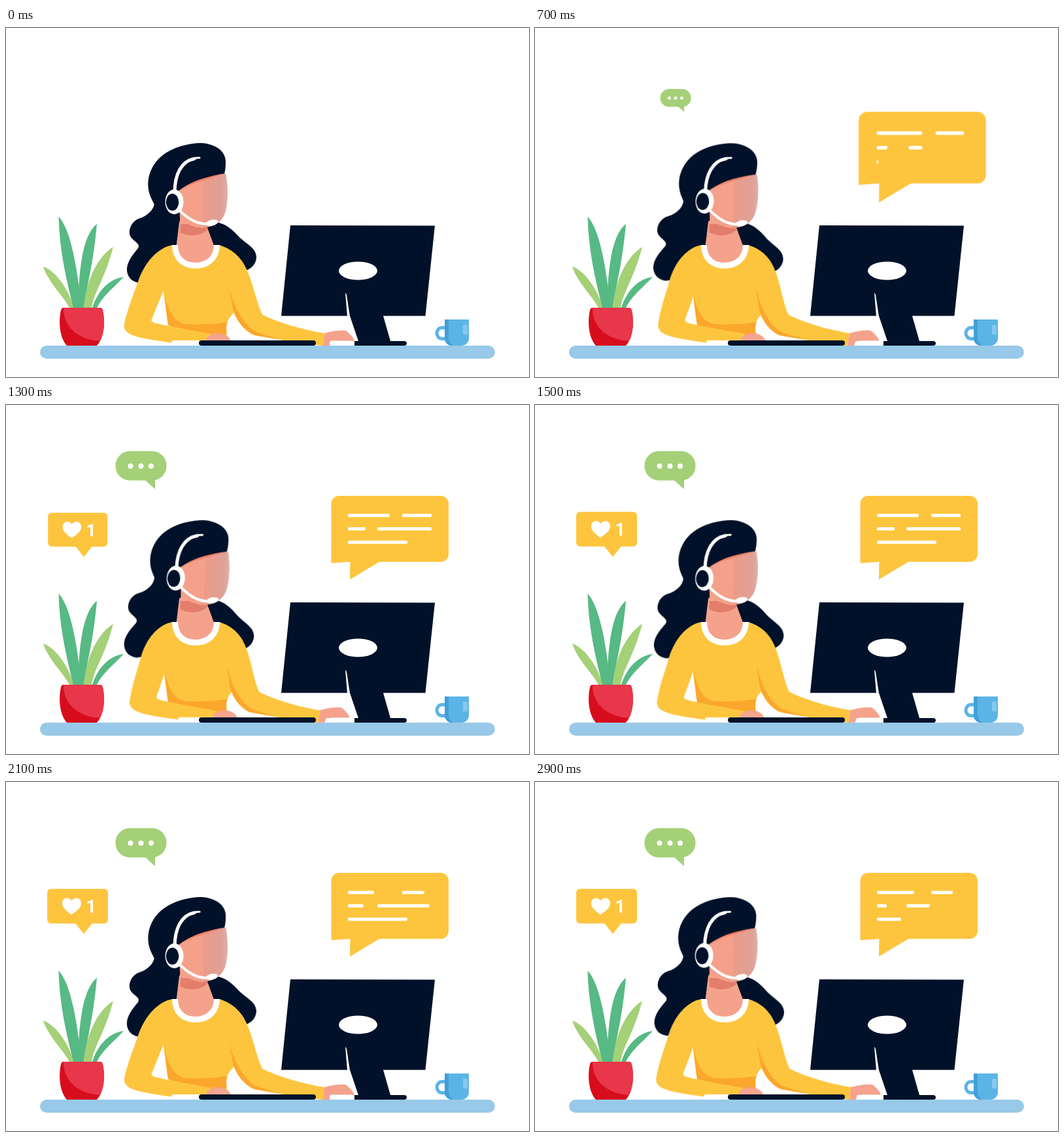
An HTML page without scripts that plays this animation: 800 by 534 pixels, repeating every 3 s.

```html
<!DOCTYPE html>
<html lang="en">
<head>
<meta charset="utf-8">
<title>Support desk</title>
<style>
html, body { margin: 0; height: 100%; overflow: hidden; background: #fff; }
svg { display: block; width: 100vw; height: 100vh; color: #fff; background: currentColor; animation: dim 3s steps(1) infinite; }
.paper { fill: currentColor; }
.wire { fill: none; stroke: currentColor; stroke-linecap: round; }
.navy { fill: #001129; }
.gold { fill: #fdc53e; }
.amber { fill: #fba62d; }
.skin { fill: #f5a28c; }
.leaf { fill: #57b983; }
.lime { fill: #a4d078; }
.sky { fill: #98c9e8; }
.cup { fill: #5cb4e6; }

@keyframes dim {
  0%, 16.67% { color: #fff; }
  13.33% { color: #f3f2f0; }
}

/* --r turns a part, --k leans it, both around --o */
.sway { --r: 0deg; --k: 0deg; transform-origin: var(--o); animation: sway 3s infinite; }
@keyframes sway {
  0%, 43.33% { animation-timing-function: cubic-bezier(.37, 0, .63, 1); }
  0%, 76.67%, 80% { transform: rotate(0deg) skewX(0deg); }
  36.67%, 43.33% { transform: rotate(var(--r)) skewX(var(--k)); }
  80% { animation-timing-function: cubic-bezier(.47, 0, .745, .715); }
  100% { transform: rotate(calc(var(--r) * .55)) skewX(calc(var(--k) * .55)); }
}
.backhair { --r: 2.3deg; --o: 290px 260px; }
.head { --r: 2deg; --o: 290px 330px; }
.left { --k: 4deg; --o: 0 335px; }
.right { --k: -2.9deg; --o: 0 335px; }

/* bubbles grow from the tip of their tail */
.pop { transform-origin: var(--o); animation: 3s linear infinite; }
.note { --o: 526px 266px; animation-name: note; }
.chat { --o: 228px 128px; animation-name: chat; }
.like { --o: 119px 232px; animation-name: like; }
@keyframes note {
  0%, 5% { transform: scale(0); }
  23.33% { transform: scale(1.085); }
  30%, 100% { transform: scale(1); }
}
@keyframes chat {
  0%, 13.33% { transform: scale(0); }
  31.67% { transform: scale(1.1); }
  38%, 100% { transform: scale(1); }
}
@keyframes like {
  0%, 23.33% { transform: scale(0); }
  39% { transform: scale(1.1); }
  43.33% { transform: scale(.98); }
  46.67%, 100% { transform: scale(1); }
}

/* --w is the full length, --a to --d the lengths on the way */
.line rect { fill: currentColor; height: 5px; rx: 2px; animation: type 3s linear infinite; }
@keyframes type {
  0%, 8% { width: 0; }
  13.33% { width: var(--a); }
  23.33% { width: var(--b); }
  36%, 63.33% { width: var(--w); }
  70% { width: var(--c); }
  81%, 85% { width: 0; }
  96.67%, 100% { width: var(--d); }
}
</style>
</head>
<body>
<svg viewBox="0 0 800 534" preserveAspectRatio="none">
  <defs>
    <linearGradient id="face">
      <stop offset=".5" stop-color="#f4a08b"/>
      <stop offset=".51" stop-color="#ea9b89"/>
      <stop offset=".88" stop-color="#dfa196"/>
      <stop offset="1" stop-color="#dcb0aa"/>
    </linearGradient>
  </defs>

  <rect class="sky" x="52" y="486" width="696" height="20" rx="10"/>

  <g id="plant">
    <path class="lime" d="M57 365C74 371 94 395 104 428H97C88 410 65 390 57 365z"/>
    <path class="leaf" d="M139 299.500C121 315 112 350 110 428H119C122 402 134 360 139 299.500z"/>
    <path class="leaf" d="M80.500 288.500C96 305 106 350 112 400V428H103C91 380 82 340 80.500 288.500z"/>
    <path class="leaf" d="M180 381C160 383 141 400 132 428H139C147 411 162 400 180 381z"/>
    <path class="lime" d="M164 335C144 347 123 380 119 428H131C134 405 151 385 164 335z"/>
    <path fill="#d70d1d" d="M88 428H144Q147 428 148 432C152 450 150 474 139 486H93C82 474 80 450 84 432Q85 428 88 428z"/>
    <path fill="#e8364a" d="M88 428H144Q147 428 148 432C152 450 150 466 144 479C115 478 87 460 88 428z"/>
  </g>

  <g id="mug">
    <path fill="none" stroke="#5cb4e6" stroke-width="5" d="M673 458.500H667A8 8.500 0 0 0 667 475.500H673"/>
    <path class="cup" d="M671 446H708V475A11 11 0 0 1 697 486H682A11 11 0 0 1 671 475z"/>
    <path fill="#439fdb" d="M671 446H677V475Q678 482 684 486H682A11 11 0 0 1 671 475z"/>
    <rect x="699" y="454" width="7" height="15" rx="1.500" fill="#86c8ef"/>
  </g>

  <g id="woman">
    <path class="navy sway backhair" d="M225 255C234 275 215 288 205 291C190 296 186 312 191 320C197 328 206 330 202 337C194 347 184 358 185 372C187 384 195 389 205 390L260 380L355 372C370 374 383 364 383 350C382 335 366 330 355 318C346 308 338 302 329 299L300 290L260 250z"/>
    <path class="skin" d="M267 280L260 338C264 356 276 364 290 364S318 354 320 338L306 300z"/>
    <path fill="#e37d6c" d="M267 300L266.500 313C282 320 298 318 308 309L306 300z"/>

    <path class="gold" d="M255 332C256 354 272 363 290 363S324 354 326 332C350 340 362 360 364 385L349 435Q338 446 337 455L338 472L256 466L247 450L241 404L240 350z"/>
    <path class="amber" d="M242 404C246 427 255 450 274 453Q305 455 339 450Q336 456 337 468L318 471L248 455z"/>

    <g class="sway left">
      <path class="gold" d="M255 332C232 336 213 358 203 385C195 408 185 432 180.500 455C181 470 198 474 253 481.500L254 478H306L314 468L258 458L230 452Q220 450 223 445L240 404L262 350z"/>
      <path class="skin" fill-opacity=".95" d="M306 479C306 470 318 466 328 467C338 469 343 474 344 480z"/>
    </g>
    <g class="sway right">
      <path class="gold" d="M326 332C348 339 362 352 371 376C380 400 385 425 392.500 439C420 452 455 462 487 467L485 486C450 482 410 476 380 470C362 462 352 446 348 434L330 380z"/>
      <path class="amber" d="M341 398C347 417 355 445 380 464Q398 471 420 476Q400 474 380 470C362 462 354 446 348 434z"/>
      <path class="skin" d="M487 467C500 463 512 462 520 463C526 468 532 474 533 479H497L495 486H485z"/>
    </g>
    <path class="wire" style="stroke-linecap:butt" stroke-width="9" d="M258.500 332C259 356 275 363.500 290 363.500S322 355 322.500 332"/>

    <g class="sway head">
      <path class="navy" d="M240 300C236 285 227 272 221 258C212 236 220 211 238 196C255 182 280 176 298 176C322 177 337 190 336 206Q336 216 334 223L268 250L266 296z"/>
      <path fill="url(#face)" d="M264 249C285 233 310 228 336 222.500C340 240 340 265 336 280C332 296 318 305 300 306Q278 304 266 290z"/>
      <path fill="#ef7f66" d="M264 250C284 233 306 228 334 222.500C310 232 285 235 264 250z"/>
      <path class="wire" stroke-width="5" d="M258 252C258 224 268 204 288 200"/>
      <path class="wire" stroke-width="3" d="M284 200.500Q290 198.500 296 198.500"/>
      <ellipse class="paper" cx="257.500" cy="266" rx="14" ry="19"/>
      <ellipse class="navy" cx="254.500" cy="266.500" rx="9.800" ry="13"/>
      <path class="wire" stroke-width="4" d="M266 280C280 293 292 300 309 300"/>
      <ellipse class="paper" cx="315" cy="298" rx="9.500" ry="4.500" transform="rotate(-12 315 298)"/>
    </g>
  </g>

  <g id="computer">
    <path class="navy" d="M435 302L656 302.500L641.500 440.500H577L588 479H609Q613 479 613 482.500T609 486H533V479H539L526 440.500H421z"/>
    <path class="paper" d="M519 405L521 408L526 441H522z"/>
    <ellipse class="paper" cx="538.500" cy="371.500" rx="29.500" ry="14"/>
    <rect class="paper" x="495" y="478.500" width="38" height="7.500" rx="3.700"/>
    <rect class="navy" x="295" y="478" width="179" height="8" rx="4"/>
  </g>

  <g class="pop note">
    <path class="gold" d="M510 139H665A12 12 0 0 1 677 151V228A12 12 0 0 1 665 240H571L526 267L526.500 240L497.500 242V151A12 12 0 0 1 509.500 139z"/>
    <g class="line">
      <rect x="523" y="166.500" style="--w:64px;--a:24px;--b:64px;--c:40px;--d:57px"/>
      <rect x="606" y="166.500" style="--w:45px;--a:4px;--b:40px;--c:34px;--d:33px"/>
      <rect x="523" y="187" style="--w:27px;--a:0px;--b:15px;--c:24px;--d:15px"/>
      <rect x="568" y="187" style="--w:83px;--a:0px;--b:19px;--c:80px;--d:36px"/>
      <rect x="523" y="207.500" style="--w:91px;--a:0px;--b:2px;--c:91px;--d:37px"/>
    </g>
  </g>

  <g class="pop chat">
    <rect class="lime" x="167.500" y="70.500" width="78" height="45" rx="22"/>
    <path class="lime" d="M212 114L228 129V108z"/>
    <path class="wire" stroke-width="8" d="M190.500 93.500h0M206.500 93.500h0M222 93.500h0"/>
  </g>

  <g class="pop like">
    <rect class="gold" x="63" y="163.500" width="93" height="53" rx="6"/>
    <path class="gold" d="M106 216L119 232.500L132 216z"/>
    <path class="paper" d="M100 203C92 197 86 192 86 186C86 176 97 175 100.500 182C104 175 115 176 115 186C115 192 109 197 100 203z"/>
    <text class="paper" x="122.500" y="200" font-family="Roboto, sans-serif" font-size="27" font-weight="700">1</text>
  </g>
</svg>
</body>
</html>
```
